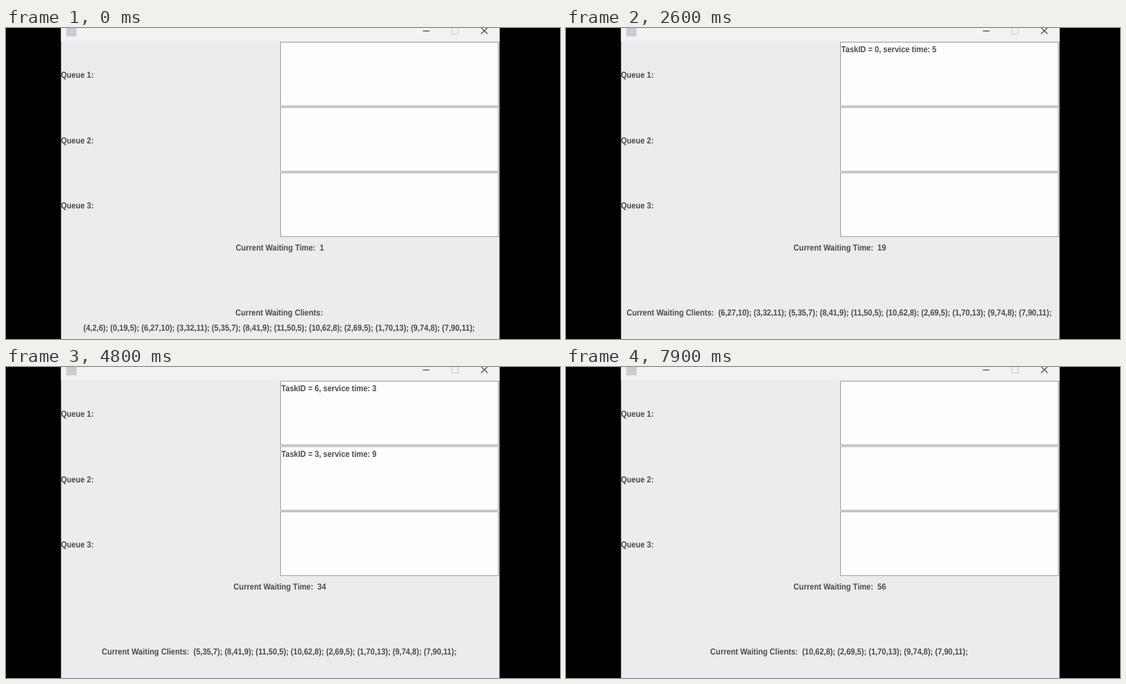
Animation, 800 px wide and 450 px high, one loop 8 s. Source, as an HTML page:

```html
<!DOCTYPE html>
<html lang="en">
<head>
<meta charset="utf-8">
<title>Queue simulation</title>
<style>
  html, body { margin: 0; width: 100%; height: 100%; overflow: hidden; background: #000; }
  svg { display: block; width: 100vw; height: 100vh; }
  text {
    font: bold 11.08px "Liberation Sans", Arial, sans-serif; fill: #4b4b4d; white-space: pre;
    text-rendering: geometricPrecision;
    transform: scale(1, 1.13); transform-box: fill-box; transform-origin: center;
  }
  .mid { text-anchor: middle; }
</style>
</head>
<body>
<svg id="stage" viewBox="0 0 800 450">
  <rect width="800" height="450" fill="#000"/>
  <rect x="79.5" width="633.1" height="450" fill="#ecebed"/>
  <rect x="79.5" width="633.1" height="19.5" fill="#f2f2f2"/>
  <rect x="87" y="-3" width="15" height="15" fill="#c9ccd2"/>
  <g fill="none" stroke="#4a4a4a" stroke-width="1.2">
    <path d="M602 4.3h9.5M686 -.5l9.5 9M695.5 -.5l-9.5 9"/>
    <rect x="644" y="-.5" width="9" height="9" stroke="#cdcdcd"/>
  </g>
</svg>
<script>
const LOOP = 8000, STEP = 100;
const FIRST_TICK = 110, TICK = 144.1;
const QUEUE_PITCH = 94.5;

// id, arrival time, service time
const clients = [
  [4, 2, 6], [0, 19, 5], [6, 27, 10], [3, 32, 11], [5, 35, 7], [8, 41, 9],
  [11, 50, 5], [10, 62, 8], [2, 69, 5], [1, 70, 13], [9, 74, 8], [7, 90, 11]
].map(([id, arrival, service]) => ({ id, arrival, service }));

// Every client takes the first queue that is idle on arrival.
const freeAt = [0, 0, 0];
for (const c of clients) {
  c.queue = freeAt.findIndex(end => end <= c.arrival);
  c.end = c.arrival + c.service;
  freeAt[c.queue] = c.end;
}

const stage = document.getElementById('stage');

function add(tag, attrs, content = '') {
  const node = document.createElementNS('http://www.w3.org/2000/svg', tag);
  for (const key in attrs) node.setAttribute(key, attrs[key]);
  node.textContent = content;
  return stage.appendChild(node);
}

const tasks = freeAt.map((_, i) => {
  const y = i * QUEUE_PITCH;
  add('text', { x: 79.2, y: 72 + y }, `Queue ${i + 1}:`);
  add('rect', { x: 396.5, y: 20.5 + y, width: 314.5, height: 92.3, fill: '#fdfdfd', stroke: '#969da5' });
  return add('text', { x: 397.6, y: 34.8 + y });
});
const timeLabel = add('text', { x: 395.4, y: 321.6, class: 'mid' });
const header = add('text', { x: 394.4, y: 416, class: 'mid' });
const overflow = add('text', { x: 394.4, y: 438, class: 'mid' });

function setText(node, value) {
  if (node.textContent !== value) node.textContent = value;
}

function render(ms) {
  const t = Math.floor(ms / STEP) * STEP;
  const now = 2 + Math.floor((t - FIRST_TICK) / TICK);

  tasks.forEach((node, i) => {
    const c = clients.find(c => c.queue === i && c.arrival <= now && now < c.end);
    setText(node, c ? `TaskID = ${c.id}, service time: ${c.end - now}` : '');
  });
  setText(timeLabel, `Current Waiting Time:  ${now}`);

  const waiting = clients.filter(c => c.arrival > now);
  const list = waiting.map(c => `(${c.id},${c.arrival},${c.service});`).join(' ');
  const wraps = waiting.length > 10;
  setText(header, 'Current Waiting Clients:' + (wraps ? '' : '  ' + list));
  setText(overflow, wraps ? list : '');
}

const start = performance.now();
function frame() {
  render((performance.now() - start) % LOOP);
  requestAnimationFrame(frame);
}
frame();
</script>
</body>
</html>
```
